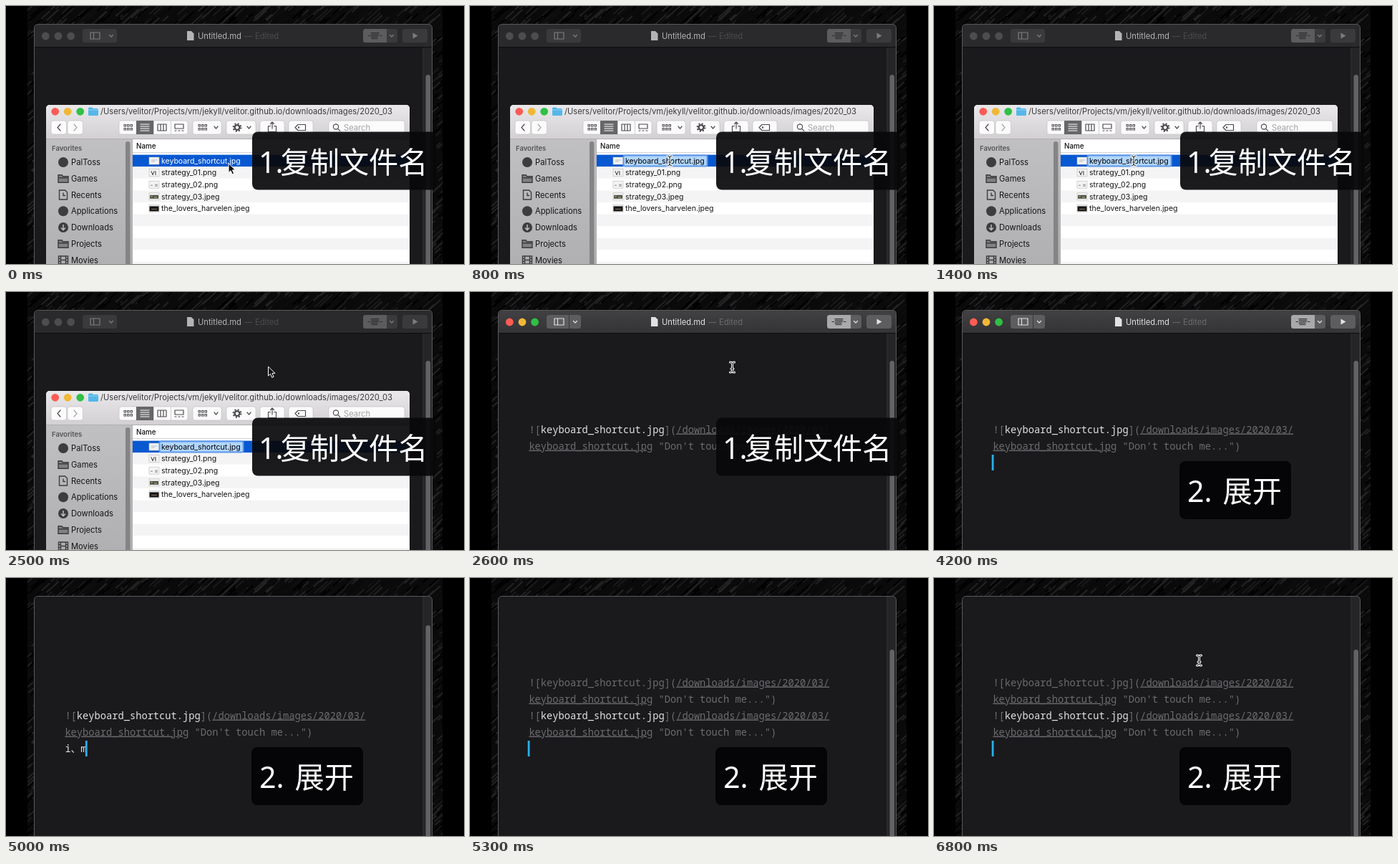
Write an HTML page that moves like this. It is 640 px wide and 360 px high and loops after 6900 ms.

```html
<!DOCTYPE html>
<html lang="en">
<head>
<meta charset="utf-8">
<title>Copy a file name, expand a snippet</title>
<style>
  html, body { margin: 0; width: 100%; height: 100%; overflow: hidden; background: #000; }
  svg { display: block; width: 640px; height: 360px; }
  text { font: 11.2px Inter, "Open Sans", sans-serif; white-space: pre; }
  .mono { font: 13.72px "Noto Sans Mono", "Noto Sans CJK SC", monospace; fill: #6c6c6e; }
  .mono .link { text-decoration: underline; }
  .bright { fill: #e2e2e2; }
  .label text { font: 41.2px "Noto Sans", "Noto Sans CJK SC", sans-serif; fill: #fff; }
  .label .light { font-weight: 300; }
  .file { font-size: 10.5px; }
  .line { fill: none; stroke-linecap: round; stroke-linejoin: round; }
  .button { fill: #fcfbfc; stroke: #bdbbbd; stroke-width: .6; }
</style>
</head>
<body>
<svg viewBox="0 0 640 360">
  <defs>
    <clipPath id="wall"><rect x="30" width="580" height="360"/></clipPath>
    <clipPath id="finderShape"><rect x="56" y="138" width="508" height="230" rx="5"/></clipPath>
    <linearGradient id="barOn" x2="0" y2="1"><stop stop-color="#414042"/><stop offset="1" stop-color="#343335"/></linearGradient>
    <linearGradient id="chrome" x2="0" y2="1"><stop stop-color="#eae8ea"/><stop offset="1" stop-color="#d2d0d2"/></linearGradient>
    <linearGradient id="side" x2="0" y2="1"><stop stop-color="#c0bfc1"/><stop offset="1" stop-color="#b0afb1"/></linearGradient>
  </defs>

  <g id="wallpaper" clip-path="url(#wall)"><rect x="30" width="580" height="360" fill="#0a0a0b"/></g>

  <!-- editor window -->
  <rect x="39.5" y="25.5" width="556" height="350" rx="5" fill="#1a191c"/>
  <path d="M583 26h8q4 0 4 5v329h-12z" fill="#252427"/>
  <path d="M583 26v334" stroke="#343336"/>
  <rect id="thumb" x="586.5" y="96" width="6.5" height="300" rx="3.2" fill="#636264"/>

  <g id="doc">
    <g id="entry">
      <text class="mono" x="82.4" y="196.5">![<tspan class="name">keyboard_shortcut.jpg</tspan>](<tspan class="link">/downloads/images/2020/03/</tspan></text>
      <text class="mono" x="82.4" y="219.7"><tspan class="link">keyboard_shortcut.jpg</tspan> "Don't touch me...")</text>
    </g>
    <text id="typed" class="mono bright" x="82.4" y="242.7"></text>
    <rect id="caret" width="2.8" height="22" fill="#2eaeea"/>
  </g>

  <g id="titleBar">
    <path id="barFill" d="M40 57V31q0-5 5-5h545q5 0 5 5v26z"/>
    <path d="M40 57.5h555" stroke="#0c0c0d"/>
    <g id="editorLights"></g>
    <g id="barButtons">
      <rect x="107" y="32" width="48" height="19" rx="3.5"/>
      <rect x="499" y="32" width="48" height="19" rx="3.5"/>
      <rect x="554" y="32" width="35" height="19" rx="3.5"/>
    </g>
    <path id="focusButton" d="M502.5 32H532v19h-29.5q-3.5 0-3.5-3.5v-12q0-3.5 3.5-3.5z"/>
    <path d="M138.5 32v19" stroke="#39383a"/>
    <path d="M506 41.5h2.5m2 0h10m2 0h2.5M510 37.5h11M510 39.5h11M510 43.5h9M511 45.5h8" class="line" stroke="#2a2a2c"/>
    <g id="barIcons">
      <path d="M118 37h13v9h-13zM122.5 37v9M144.5 40.5l2.5 2.5 2.5-2.5M536.5 40.5l2.5 2.5 2.5-2.5" class="line" stroke="currentColor" stroke-width="1.2"/>
      <path d="M568.5 37.5l7 4-7 4z" fill="currentColor"/>
    </g>
    <g id="barTitle">
      <path d="M253 35h6l3.5 3.5V48H253z"/>
      <text x="268" y="46">Untitled.md</text>
    </g>
    <g id="barStatus"><text x="333" y="46">—</text><text x="348" y="46">Edited</text></g>
  </g>
  <rect x="39.5" y="25.5" width="556" height="350" rx="5" fill="none" stroke="#59585b"/>

  <!-- file window -->
  <g id="finder" clip-path="url(#finderShape)">
    <rect x="56" y="138" width="508" height="222" fill="#fff"/>
    <rect x="56" y="138" width="508" height="47" fill="url(#chrome)"/>
    <rect x="56" y="185" width="121" height="175" fill="url(#side)"/>
    <rect x="167" y="189" width="6.5" height="190" rx="3.2" fill="#858386"/>
    <path d="M56 185.5h508M176.5 185v175" stroke="#b0aeb0"/>
    <path d="M177 204.5h387" stroke="#d5d4d5"/>
    <g id="finderLights"></g>
    <path d="M115 143q0-1.5 1.5-1.5h4l1.5 1.5h5.5q1.5 0 1.5 1.5v7q0 1.5-1.5 1.5h-11q-1.5 0-1.5-1.5z" fill="#55b7ea"/>
    <path d="M115 145h14" stroke="#8fd3f6"/>
    <text x="132" y="151" fill="#3c3b3c">/Users/velitor/Projects/vm/jekyll/velitor.github.io/downloads/images/2020_03</text>

    <g id="toolbar"></g>
    <path d="M206.5 160v19M230.5 160v19" stroke="#d0ced0"/>
    <rect x="182" y="160" width="24" height="19" fill="#666567"/>
    <g class="line" stroke="#4c4b4d" stroke-width="1.2">
      <path d="M76 165l-4 4.5 4 4.500"/>
      <path d="M95 165l4 4.5-4 4.500" stroke="#a9a8a9"/>
      <path d="M188 165h12m-12 3h12m-12 3h12m-12 3h12" stroke="#fff"/>
      <path d="M212 165h12v9h-12zM216 165v9m4-9v9M236 165h12v6h-12zM236 174h2m3 0h2m3 0h2M291 168l2.5 3 2.5-3M337 168l2.5 3 2.5-3"/>
      <path d="M369.5 167.5h-3v8h11v-8h-3M372 171v-9m-2.5 2.5l2.5-2.5 2.5 2.5M408 165.5h10.5v8H408l-4-4z"/>
      <circle cx="409" cy="169.5" r=".6"/>
      <circle cx="323" cy="169.5" r="3.4" stroke-width="2.4"/>
      <circle cx="323" cy="169.5" r="5.4" stroke-dasharray="2 2.24" stroke-width="2" stroke-linecap="butt"/>
      <circle cx="461" cy="168.5" r="3.6"/><path d="M463.8 171.3l3 3"/>
    </g>
    <g id="gridIcons" fill="none" stroke="#4c4b4d"></g>
    <text x="472" y="173.5" fill="#a2a1a3">Search</text>

    <text x="64" y="202" style="font-size:9.5px;font-weight:600" fill="#555456">Favorites</text>
    <text x="182" y="199" style="font-size:9.8px;font-weight:500" fill="#111">Name</text>
    <g id="sidebar" fill="#161616"></g>
    <g id="files"></g>
    <g id="rename">
      <rect x="214.5" y="208.5" width="117" height="15" rx="2" fill="#b2d6fd" stroke="#5f9aea" stroke-width="2"/>
      <text class="file" x="217" y="219.8">keyboard_shortcut.jpg</text>
    </g>
  </g>

  <g id="copyLabel" class="label">
    <rect x="344" y="175.5" width="257" height="81" rx="8" fill="#08080a" opacity=".92"/>
    <text class="light" x="353" y="232.5">1.<tspan x="383.5">复制文件名</tspan></text>
  </g>
  <g id="expandLabel" class="label">
    <rect x="343" y="236" width="156" height="81" rx="8" fill="#050507"/>
    <text x="354" y="292.500">2.<tspan x="403.5">展开</tspan></text>
  </g>

  <path id="arrow" d="M0 0v13l3-2.7 2.2 5 2.4-1-2.2-4.9h4z" fill="#111" stroke="#fff" stroke-width="1"/>
  <g id="beam" class="line">
    <path d="M-3-7q3 0 3 2.5v9Q0 7-3 7M3-7Q0-7 0-4.5M3 7Q0 7 0 4.5M-1.5 2h3" stroke="#fff" stroke-width="3"/>
    <path d="M-3-7q3 0 3 2.5v9Q0 7-3 7M3-7Q0-7 0-4.5M3 7Q0 7 0 4.5M-1.5 2h3" stroke="#222" stroke-width="1"/>
  </g>
</svg>

<script>
const $ = id => document.getElementById(id);
const add = (id, markup) => $(id).insertAdjacentHTML('beforeend', markup);
const set = (id, attrs) => { for (const k in attrs) $(id).setAttribute(k, attrs[k]); };
const show = (id, on) => { $(id).style.display = on ? '' : 'none'; };

// Wallpaper: seeded slanted streaks in a few dark greys.
let seed = 7;
const random = () => (seed = seed * 16807 % 2147483647) / 2147483647;
for (const grey of ['#1a1a1b', '#000', '#232324', '#0d0d0e']) {
  let d = '';
  for (let i = 0; i < 600; i++) {
    const length = 6 + random() * 16;
    d += `M${20 + random() * 590} ${random() * 380}l${length} ${-length * .9}`;
  }
  add('wallpaper', `<path d="${d}" class="line" stroke="${grey}" stroke-width="2"/>`);
}

const lightColors = ['#fb5d55', '#f0b836', '#2fc045'];
const lights = (id, xs, y) => xs.forEach((x, i) =>
  add(id, `<circle cx="${x}" cy="${y}" r="5.4" fill="${lightColors[i]}"/>`));
lights('editorLights', [55.3, 73, 90.6], 42);
lights('finderLights', [68.7, 86.2, 103.7], 147.3);

for (const [x, width] of [[63, 21.5], [86, 21.5], [158, 96], [261, 40], [308, 41], [355, 34], [395, 34], [451, 106]])
  add('toolbar', `<rect class="button" x="${x}" y="160" width="${width}" height="19" rx="3.5"/>`);
for (const left of [165, 269])
  for (let i = 0; i < 6; i++)
    add('gridIcons', `<rect x="${left + i % 3 * 4.5}" y="${i < 3 ? 165.5 : 170.5}" width="2.5" height="2.5"/>`);

const folder = 'M-7-5h5l1.5 2H7v8.5H-7zM-7-1H7';
const sidebarItems = [
  ['PalToss', 'dot'], ['Games', folder, '#807f81'],
  ['Recents', 'M-5.5-6.5h8l3 3v10h-11zM0-3v4h3'],
  ['Applications', 'dot'],
  ['Downloads', 'M0-4v7.5m-3-3l3 3 3-3'],
  ['Projects', folder, '#807f81'],
  ['Movies', 'M-6.5-5.5h13v11h-13zM-3.5-5.5v11m7-11v11M-3.5 0h7M-6.5-2h3m-3 4h3m7-4h3m-3 4h3'],
];
const disc = '<circle r="7" fill="#3d3c3e"/>';
sidebarItems.forEach(([name, icon, fill = 'none'], i) => {
  const y = 218 + i * 22.75, onDisc = name == 'Downloads';
  const shape = icon == 'dot' ? disc : (onDisc ? disc : '') +
    `<path d="${icon}" fill="${fill}" stroke="${onDisc ? '#c8c7c9' : '#3d3c3e'}" stroke-width="1.4"/>`;
  add('sidebar', `<g transform="translate(80 ${y})">${shape}</g><text x="91" y="${y + 4}">${name}</text>`);
});

const files = ['keyboard_shortcut.jpg', 'strategy_01.png', 'strategy_02.png', 'strategy_03.jpeg', 'the_lovers_harvelen.jpeg'];
const thumbInk = [
  '<path d="M203 215h8m-8 2h5" stroke="#b5bdc8"/>',
  '<path d="M203 214l2 5 2-5m2 0v5" class="line" stroke="#333"/>',
  '<path d="M202 217h3m3-1h4m-4 2h4" stroke="#888"/>',
  '<path d="M201 214h12v5h-12z" fill="#4b5145"/><path d="M202 216h3m2 1h4" stroke="#c3b884"/>',
  '<path d="M200.5 213h13v7h-13z" fill="#151515"/><path d="M203 217h8" stroke="#957d68"/>',
];
for (let i = 0; i < 10; i++) {
  const dy = i * 16.6, fill = i == 0 ? '#0758d1' : i % 2 ? '#f4f4f5' : '#fff';
  add('files', `<rect x="177" y="${207.6 + dy}" width="387" height="16.6" fill="${fill}"/>`);
  if (files[i]) add('files', `<g transform="translate(0 ${dy})">
    <rect x="200" y="211" width="14" height="10" fill="#f3f3f3" stroke="#bbb" stroke-width=".6"/>${thumbInk[i]}
    <text class="file" x="217" y="219.8" fill="${i ? '#161616' : '#fff'}">${files[i]}</text></g>`);
}

const second = $('entry').cloneNode(true);
second.id = 'secondEntry';
second.setAttribute('transform', 'translate(0 46)');
$('entry').after(second);
second.querySelector('.name').classList.add('bright');

const between = (t, a, b) => t >= a && t < b;
const ease = (t, a, b) => {
  const p = Math.min(1, Math.max(0, (t - a) / (b - a)));
  return p * p * (3 - 2 * p);
};

function pointer(t) {
  if (t < 1800) {
    const p = ease(t, 100, 700);
    return [311 - 32 * p, 219.5 - 3.5 * p];
  }
  if (t < 4200) {
    const p = ease(t, 1800, 2500);
    return [279 + 87.5 * p, 216 - 112 * p + (t >= 2600 ? 1 : 0)];
  }
  const p = (t - 6600) / 200;
  return [367 + 3.5 * p, 105 + 10 * p];
}

function draw(t) {
  const active = t >= 2600, expanded = t >= 5200, scrolled = t >= 5300;

  show('finder', !active);
  show('rename', t >= 800);
  show('titleBar', t < 4300);
  set('barFill', { fill: active ? 'url(#barOn)' : '#2a292b' });
  set('barButtons', { fill: active ? '#5d5c5e' : '#3a393b' });
  set('focusButton', { fill: active ? '#a9a8aa' : '#5c5b5d' });
  set('barIcons', { color: active ? '#e2e2e2' : '#7d7c7e' });
  set('barTitle', { fill: active ? '#e2e2e2' : '#b4b3b5' });
  set('barStatus', { fill: active ? '#6c6b6d' : '#4c4b4d' });
  [...$('editorLights').children].forEach((c, i) => c.setAttribute('fill', active ? lightColors[i] : '#4d4c4e'));
  set('thumb', { y: t < 4300 ? 96 : scrolled ? 100 : 66 });

  const typed = expanded ? '' : t >= 5000 ? 'i、m' : t >= 4500 ? 'i、' : t >= 4300 ? 'i' : '';
  $('typed').textContent = typed;
  const column = [...typed].reduce((x, c) => x + (c == '、' ? 13.72 : 8.232), 0);
  set('caret', { x: 80.7 + column, y: expanded ? 273 : 227 });
  show('caret', between(t, 3200, 3700) || between(t, 4200, 4700) || between(t, 5000, 5800) || t >= 6300);
  show('secondEntry', expanded);
  $('entry').querySelector('.name').classList.toggle('bright', !expanded);
  set('doc', { transform: `translate(0 ${scrolled ? -46 : 0})` });

  set('copyLabel', { opacity: Math.min(1, Math.max(0, (3100 - t) / 300)) });
  show('expandLabel', t >= 3900);

  const [x, y] = pointer(t), beam = between(t, 800, 1900) || active;
  const visible = t < 4200 || t >= 6600;
  show('arrow', visible && !beam);
  show('beam', visible && beam);
  for (const id of ['arrow', 'beam']) set(id, { transform: `translate(${x} ${y})` });
}

function tick() {
  draw(Math.floor(performance.now() % 6900 / 100) * 100);
  requestAnimationFrame(tick);
}
tick();
</script>
</body>
</html>
```
